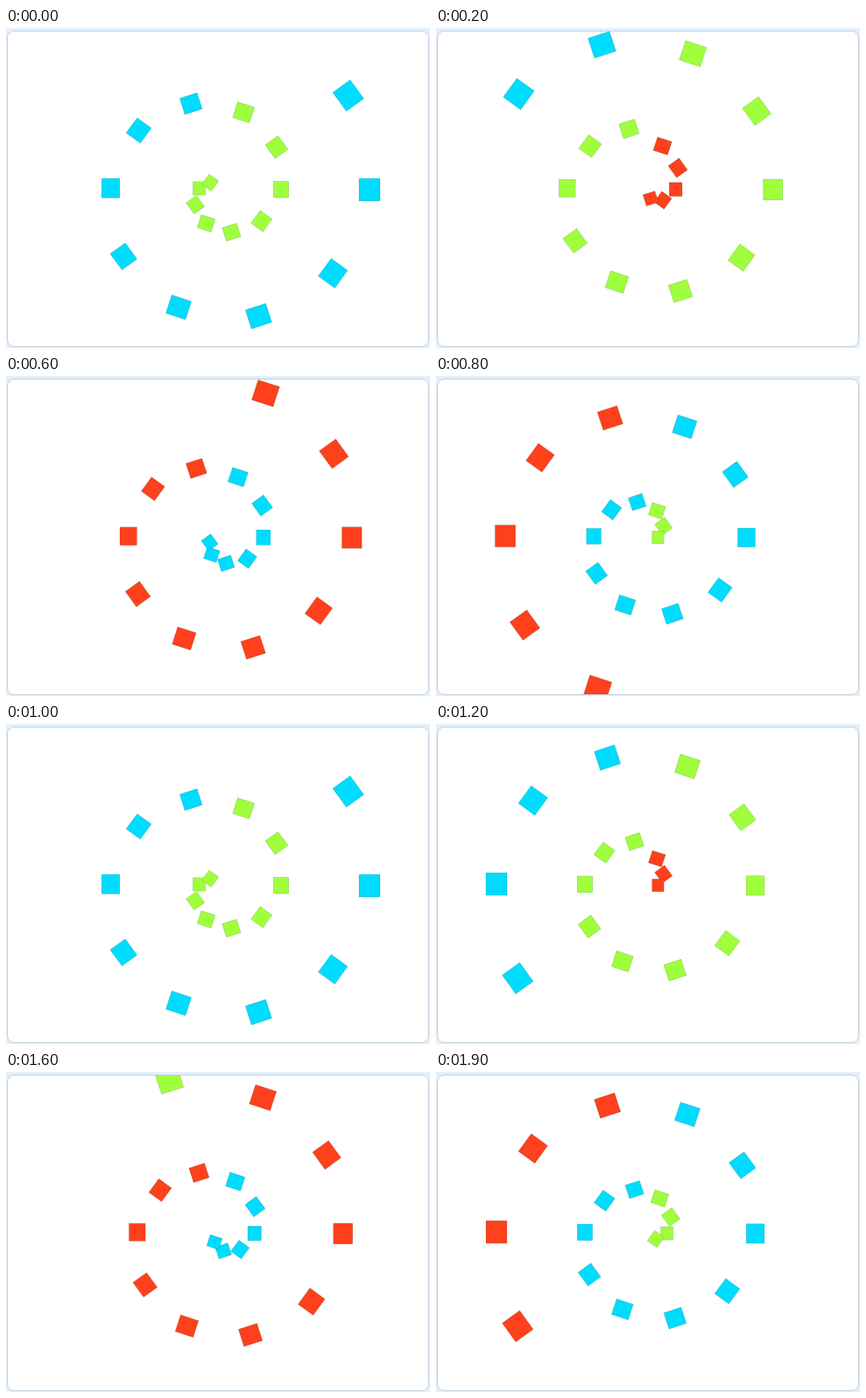
These frames come from a looping animation (484 px wide and 366 px high, 2 s). An HTML page with a canvas:

```html
<!DOCTYPE html>
<html lang="en">
<head>
<meta charset="utf-8">
<title>Square spiral</title>
<style>
  html, body { margin: 0; width: 100%; height: 100%; overflow: hidden; background: #e6f0fa; }
  canvas { display: block; }
</style>
</head>
<body>
<canvas id="stage" width="484" height="366"></canvas>
<script>
const ctx = document.getElementById('stage').getContext('2d');
const COLORS = ['#ff401c', '#00dcff', '#a0ff3c'];
const LIFETIME = 18;
const CYCLE = 31; // thirty squares and one pause
const FRAME_MS = 100;
// Spiral steps completed at each tick; the playback is slightly uneven.
const STEPS = [0, 3, 7, 9, 13, 15, 19, 21, 25, 27, 31, 34, 36, 39, 43, 45, 49, 51, 55, 57];

function panelPath() {
  ctx.beginPath();
  ctx.roundRect(1.5, 3.5, 481, 361, 8);
}

function drawSquare(born, age) {
  const slot = (born - 3 + 2 * CYCLE) % CYCLE;
  if (slot === CYCLE - 1) return;
  const width = 13.4 + 0.66 * age;
  const height = 14.4 + 0.71 * age;
  ctx.save();
  ctx.translate(242, 184);
  ctx.rotate((slot % 10 - 2) * Math.PI / 5);
  ctx.translate(11.4 + 10.1 * age, 0.5 + 0.03 * age);
  ctx.fillStyle = COLORS[Math.floor(slot / 10)];
  ctx.fillRect(-width / 2, -height / 2, width, height);
  ctx.lineWidth = 0.6;
  ctx.strokeStyle = 'rgba(0, 60, 0, 0.25)';
  ctx.strokeRect(-width / 2, -height / 2, width, height);
  ctx.restore();
}

function draw(step) {
  ctx.fillStyle = '#e6f0fa';
  ctx.fillRect(0, 0, 484, 366);
  panelPath();
  ctx.fillStyle = '#fff';
  ctx.fill();
  ctx.save();
  ctx.clip();
  for (let age = LIFETIME - 1; age >= 0; age--) drawSquare(step - age, age);
  ctx.restore();
  panelPath();
  ctx.lineWidth = 1;
  ctx.strokeStyle = '#bccfe0';
  ctx.stroke();
}

const start = performance.now();
function tick() {
  const elapsed = performance.now() - start;
  draw(STEPS[Math.floor(elapsed / FRAME_MS) % STEPS.length]);
  requestAnimationFrame(tick);
}
tick();
</script>
</body>
</html>
```
